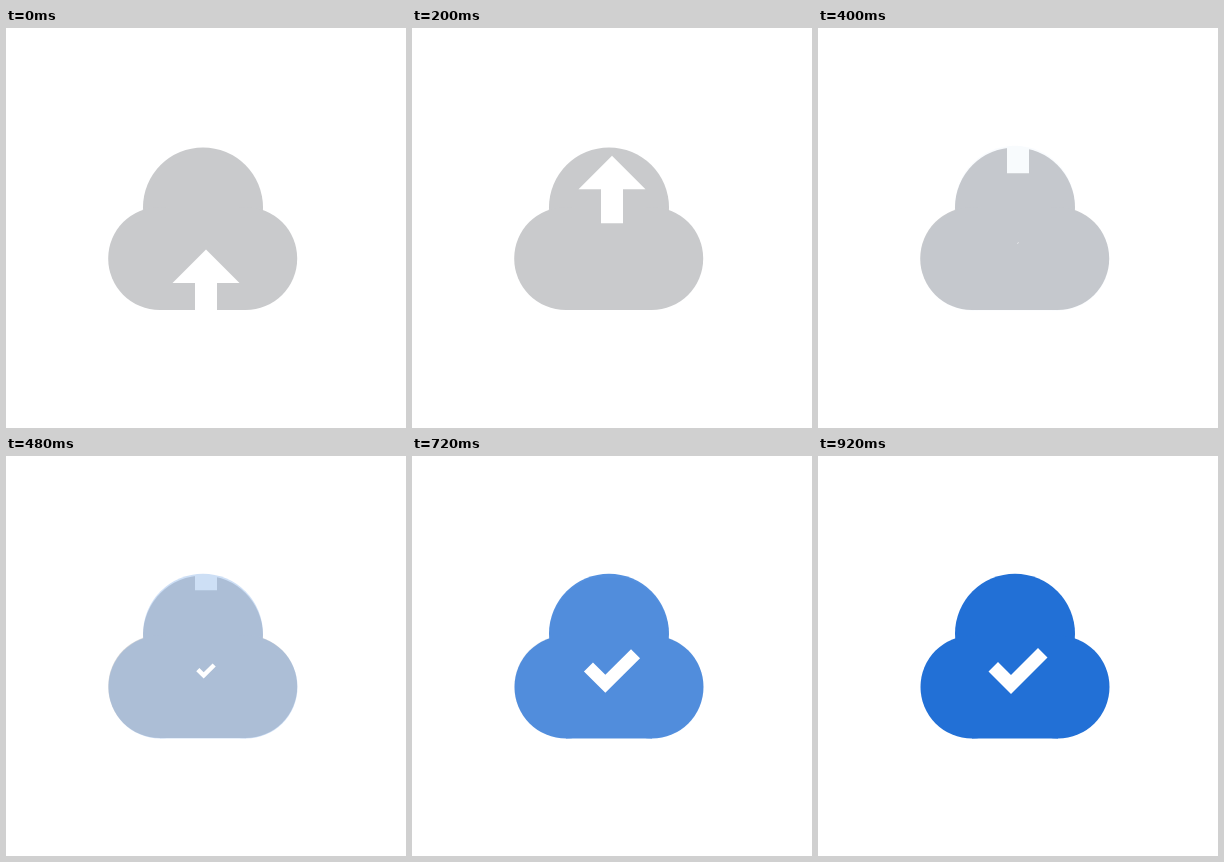
An HTML page that plays this animation: 400 by 400 pixels, repeating every 1.64 s.

```html
<!DOCTYPE html>
<html lang="en">
<head>
<meta charset="utf-8">
<title>Cloud upload</title>
<style>
  html, body { margin: 0; width: 100%; height: 100%; overflow: hidden; background: #fff; }
  svg { display: block; width: 100%; height: 100%; }
</style>
</head>
<body>
<svg viewBox="0 0 400 400">
  <g id="idle">
    <g fill="#c9cacc">
      <circle cx="197" cy="179.5" r="60"/>
      <circle cx="153.7" cy="230.5" r="51.5"/>
      <circle cx="239.7" cy="230.5" r="51.5"/>
      <rect x="153.7" y="180" width="86" height="102"/>
    </g>
    <path id="arrow" fill="#fff" d="M200 221.5L233.5 255H211V289H189V255H166.5Z"/>
  </g>
  <g id="done" fill="#2270d6" opacity="0">
    <circle cx="197" cy="177.7" r="60"/>
    <circle cx="154" cy="231" r="51.5"/>
    <circle cx="240" cy="231" r="51.5"/>
    <rect x="154" y="180" width="86" height="102.5"/>
  </g>
  <g id="check" transform="translate(200 215) scale(0)">
    <path fill="#fff" d="M-29.5 .5L-20 -9L-7 4L20 -23L29.5 -13.5L-7 23Z"/>
  </g>
</svg>
<script>
  const LOOP = 1640, STEP = 40, END = 920;
  const [idle, arrow, done, check] =
    ['idle', 'arrow', 'done', 'check'].map(id => document.getElementById(id));

  // time in ms, opacity of the blue cloud
  const FADE = [[390, 0], [480, .22], [600, .46], [720, .77], [800, .92], [920, 1]];

  const progress = (t, start, length) => Math.min(1, Math.max(0, (t - start) / length));
  const cubicOut = u => 1 - (1 - u) ** 3;
  const sineOut = u => Math.sin(u * Math.PI / 2);

  function track(table, t) {
    if (t <= table[0][0]) return table[0][1];
    for (let i = 1; i < table.length; i++) {
      const [t0, v0] = table[i - 1], [t1, v1] = table[i];
      if (t <= t1) return v0 + (v1 - v0) * (t - t0) / (t1 - t0);
    }
    return table[table.length - 1][1];
  }

  function draw(t) {
    const rise = 168 * cubicOut(progress(t, 0, 840));
    const blue = track(FADE, t);
    const size = sineOut(progress(t, 392, 410));
    arrow.setAttribute('transform', `translate(0 ${-rise})`);
    idle.setAttribute('opacity', 1 - blue);
    done.setAttribute('opacity', blue);
    check.setAttribute('transform', `translate(200 215) scale(${size})`);
  }

  const begin = performance.now();
  function tick() {
    const t = (performance.now() - begin) % LOOP;
    draw(Math.min(END, Math.floor(t / STEP) * STEP));
    requestAnimationFrame(tick);
  }
  tick();
</script>
</body>
</html>
```
